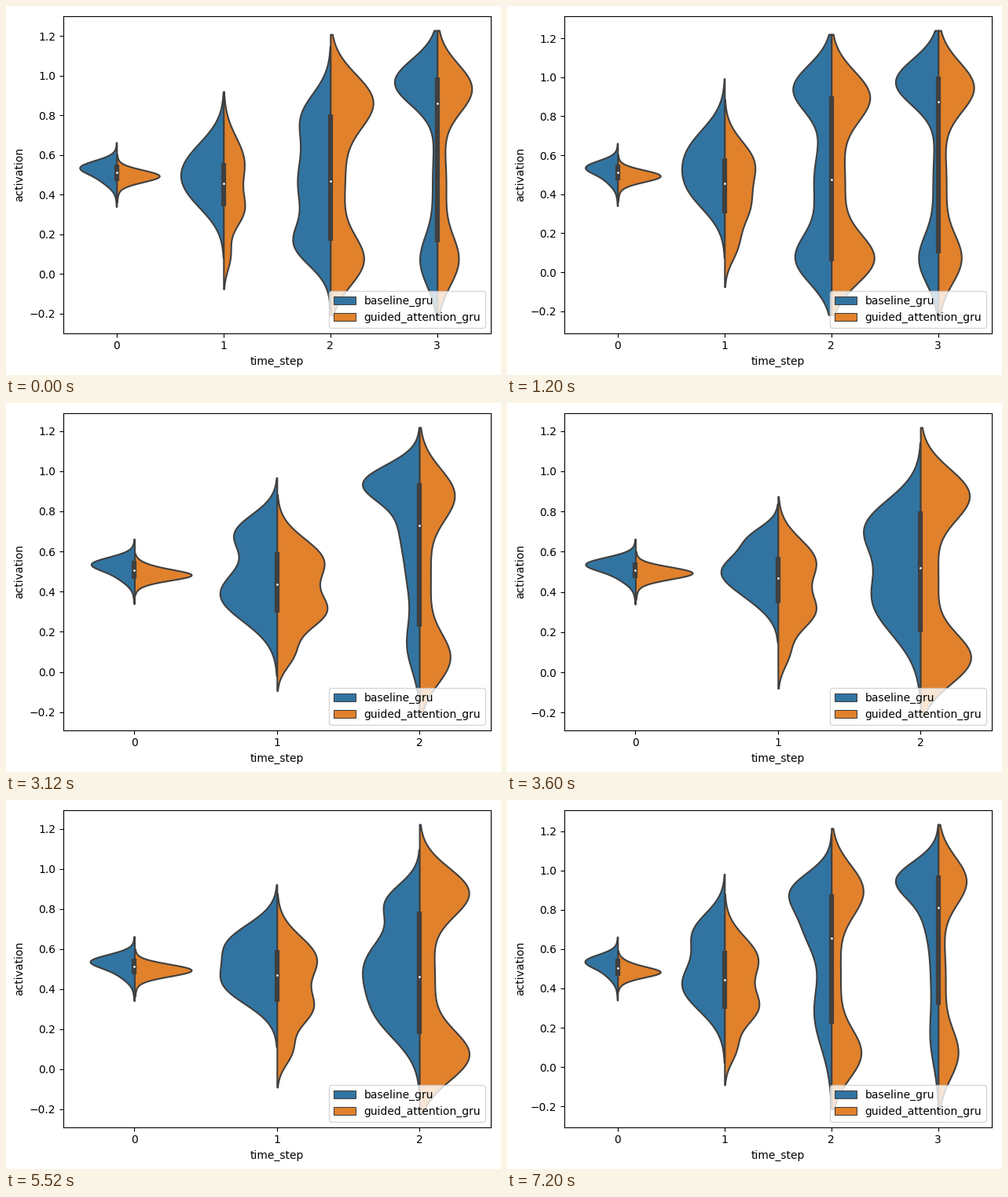
These frames come from a looping animation (630x470 px, 8000 ms). A matplotlib script:

```python
import numpy as np
import matplotlib.pyplot as plt
from matplotlib.animation import FuncAnimation
from matplotlib.patches import Patch

plt.rcParams["font.family"] = "DejaVu Sans"

W, H, DPI = 630, 470, 100
LEFT, RIGHT, TOP, BOTTOM = 72.8, 616.8, 12.7, 416.7
BLUE, ORANGE, GRAY = "#3274a1", "#e1812c", "#3f3f3f"
STEP_MS = 400
STEPS = 20
STEPS_PER_SCENE = 3
HALF_WIDTH = .4
TAIL = .01  # a violin ends where its density falls below this

# Every density is a sum of bumps: (center, spread, height).
SPIKE = (.494, .03, .94), (.48, .06, .07)
SHARP_SPIKE = (.481, .022, .4), (.488, .037, .56)


def narrow(peak, shoulder):
    """One peak with a shoulder below it and faint tails."""
    return (.541, .033, peak), (.48, .039, shoulder), (.5, .1, .035)


def triple(high, low, foot):
    """Two close humps and a small foot."""
    return (.55, .113, high), (.3, .092, low), (.09, .072, foot)


def twin(top, waist, low, at=.885, spread=.13):
    """Two far peaks joined by a thin waist."""
    return (at, spread, top), (.47, .21, waist), (.066, .127, low)


def density(bumps, y):
    return sum(h * np.exp(-((y - c) / s) ** 2 / 2) for c, s, h in bumps)


def scene(low, high, *violins):
    """Value range, then (quartiles with median, left half, right half)."""
    return low, high, violins


SCENES = [
    scene(-.226, 1.228,
          ((.469, .513, .552), narrow(.74, .3), SPIKE),
          ((.343, .457, .56),
           ((.57, .12, .68), (.41, .115, .58)),
           ((.56, .13, .48), (.315, .087, .4), (.09, .072, .15))),
          ((.168, .469, .806),
           ((.806, .119, .53), (.461, .198, .77), (.14, .103, .66)),
           twin(.96, .33, .74, .872, .137)),
          ((.16, .861, .992),
           twin(.98, .11, .385, .968, .115),
           twin(.78, .2, .46, .937, .123))),
    scene(-.239, 1.2405,
          ((.473, .513, .553), narrow(.66, .22), SPIKE),
          ((.303, .456, .585),
           ((.626, .125, .75), (.424, .12, .7)),
           ((.561, .113, .68), (.328, .105, .53), (.126, .08, .24))),
          ((.058, .477, .904),
           twin(.85, .4, .77, .944, .121), twin(.845, .3, .93, .903)),
          ((.098, .875, 1.004),
           twin(.97, .12, .43, .976, .118), twin(.8, .18, .5, .95, .128))),
    scene(-.218, 1.218,
          ((.465, .508, .555), narrow(.62, .22), SHARP_SPIKE),
          ((.297, .438, .598),
           ((.696, .094, .68), (.388, .134, 1)), triple(.81, .8, .26)),
          ((.226, .731, .942),
           ((.946, .09, .88), (.754, .137, .3), (.48, .156, .2),
            (.129, .125, .21)),
           twin(.59, .19, .51))),
    scene(-.216, 1.218,
          ((.47, .509, .548), narrow(.77, .25), SPIKE),
          ((.345, .47, .575),
           ((.677, .059, .33), (.513, .094, .91), (.372, .086, .28)),
           triple(.65, .6, .165)),
          ((.2, .521, .802),
           ((.73, .137, .91), (.365, .176, .86)), twin(.84, .31, .86))),
    scene(-.2186, 1.2225,
          ((.474, .514, .553), narrow(.68, .22), SPIKE),
          ((.337, .471, .596),
           ((.635, .098, .76), (.427, .106, .88)), triple(.68, .57, .235)),
          ((.176, .463, .788),
           ((.843, .09, .48), (.53, .157, .9), (.259, .133, .57)),
           twin(.83, .26, .83, spread=.122))),
    scene(-.2164, 1.218,
          ((.47, .509, .552), narrow(.66, .27), SPIKE),
          ((.364, .501, .61),
           ((.755, .07, .18), (.598, .078, .62), (.481, .113, .58)),
           triple(.57, .47, .19)),
          ((.227, .544, .821),
           ((.782, .117, .91), (.528, .117, .72), (.266, .109, .69)),
           twin(.79, .26, .83))),
    scene(-.2324, 1.234,
          ((.465, .505, .553), narrow(.63, .21), SHARP_SPIKE),
          ((.297, .445, .593),
           ((.692, .1, .66), (.417, .13, 1)), triple(.78, .74, .24)),
          ((.221, .657, .88),
           ((.908, .092, .72), (.728, .14, .66), (.281, .18, .43)),
           twin(.76, .22, .7, .9)),
          ((.317, .812, .976),
           ((.96, .092, .87), (.8, .128, .3), (.5, .18, .175),
            (.14, .14, .175)),
           twin(.66, .17, .45, .948, .122))),
]

fig = plt.figure(figsize=(W / DPI, H / DPI), dpi=DPI)
ax = fig.add_axes([LEFT / W, 1 - BOTTOM / H,
                   (RIGHT - LEFT) / W, (BOTTOM - TOP) / H])


def draw_violin(x, low, high, quartiles, *halves):
    y = np.linspace(low, high, 600)
    widths = [density(bumps, y) for bumps in halves]
    scale = HALF_WIDTH / np.max(widths)
    for w, side, color in zip(widths, (-1, 1), (BLUE, ORANGE)):
        shown = w > TAIL
        ax.fill_betweenx(y[shown], x, x + side * scale * w[shown],
                         facecolor=color, edgecolor=GRAY, linewidth=1.5)
    lower, median, upper = quartiles
    ax.plot([x, x], [lower, upper], color=GRAY, lw=4.5,
            solid_capstyle="butt")
    ax.scatter(x, median, s=9, color="white", edgecolor=GRAY,
               linewidth=1, zorder=3)


def update(step):
    low, high, violins = SCENES[step // STEPS_PER_SCENE]
    count = len(violins)
    ax.clear()
    for x, shape in enumerate(violins):
        # Earlier violins reach slightly less far than the last one.
        trim = .02 * (count - 1 - x)
        draw_violin(x, low + trim, high - trim, *shape)

    margin = .05 * (high - low)
    ax.set_xlim(-.5, count - .5)
    ax.set_ylim(low - margin, high + margin)
    ax.set_xticks(range(count))
    ax.set_xlabel("time_step")
    ax.set_ylabel("activation")
    keys = [Patch(facecolor=c, edgecolor=GRAY, linewidth=.75, label=name)
            for c, name in ((BLUE, "baseline_gru"),
                            (ORANGE, "guided_attention_gru"))]
    ax.legend(handles=keys, loc="lower right")
    return []


anim = FuncAnimation(fig, update, frames=STEPS, interval=STEP_MS,
                     init_func=lambda: update(0), repeat=True, repeat_delay=0)
plt.show()
```
